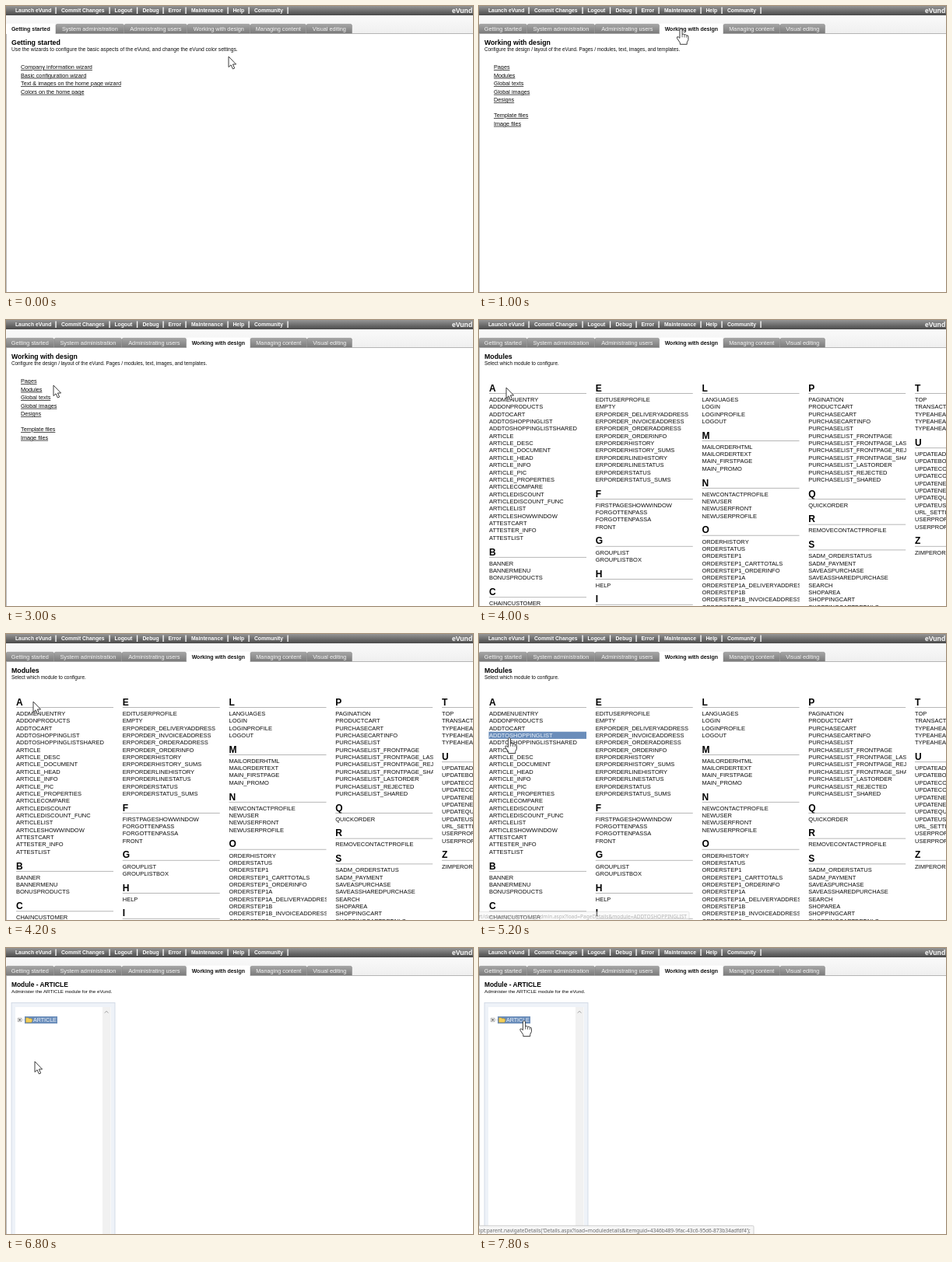
Write an HTML page that moves like this. It is 600 px wide and 368 px high and loops after 8 s.

```html
<!DOCTYPE html>
<html lang="en">
<head>
<meta charset="utf-8">
<title>Shop administration</title>
<style>
html, body { margin: 0; width: 100%; height: 100%; overflow: hidden; background: #fff; }
svg { display: block; width: 100vw; height: 100vh; }
text { font-family: "Liberation Sans", Arial, sans-serif; white-space: pre; }
.status text { font-family: "Noto Sans", "Open Sans", sans-serif; }
</style>
</head>
<body>
<svg id="stage" viewBox="0 0 600 368" preserveAspectRatio="none">
  <defs>
    <linearGradient id="bar" x2="0" y2="1"><stop stop-color="#959595"/><stop offset="1" stop-color="#4a4a4a"/></linearGradient>
    <linearGradient id="strip" x2="0" y2="1"><stop stop-color="#fafafa"/><stop offset="1" stop-color="#efefef"/></linearGradient>
    <linearGradient id="tab" x2="0" y2="1"><stop stop-color="#a6a6a6"/><stop offset="1" stop-color="#7c7c7c"/></linearGradient>
  </defs>
</svg>
<script>
const LOOP = 8000, STEP = 200;
const BRAND = 'eVund';
const BLUE = '#6a8dba', INK = '#0c0c0c';
const stage = document.getElementById('stage');

function add(parent, tag, attrs = {}, content) {
  const el = document.createElementNS('http://www.w3.org/2000/svg', tag);
  for (const key in attrs) el.setAttribute(key, attrs[key]);
  if (content !== undefined) el.textContent = content;
  parent.appendChild(el);
  return el;
}
const group = (parent = stage, attrs) => add(parent, 'g', attrs);
const rect = (parent, x, y, width, height, fill, more) =>
  add(parent, 'rect', { x, y, width, height, fill, ...more });
const text = (parent, x, y, size, str, fill = INK, more) =>
  add(parent, 'text', { x, y, 'font-size': size, fill, ...more }, str);
const show = (el, on) => el.setAttribute('display', on ? 'inline' : 'none');
const BOLD = { 'font-weight': 700 };

// Fixed frame around every page
rect(stage, 0, 0, 600, 368, '#fff');
rect(stage, 0, 12, 600, 23.5, 'url(#strip)');
rect(stage, 0, 0, 600, 12, 'url(#bar)');
rect(stage, 0, 35, 600, 0.8, '#a5a5a5');
rect(stage, 0, 35, 0.9, 333, '#b0b0b0');
[['Launch ' + BRAND, 12, 64], ['Commit Changes', 71, 133], ['Logout', 139.5, 168.5],
 ['Debug', 175.5, 202], ['Error', 208.5, 231], ['Maintenance', 238, 285],
 ['Help', 291.5, 312], ['Community', 319, 362]].forEach(([label, x, end]) => {
  text(stage, x, 8.3, 6.75, label, '#fff', BOLD);
  rect(stage, end - 0.6, 1.5, 1.3, 8.5, '#fff');
});
text(stage, 573, 9.3, 8.7, BRAND, '#fff', BOLD);

// Tab strips
const TABS = ['Getting started', 'System administration', 'Administrating users',
  'Working with design', 'Managing content', 'Visual editing'];

function tabStrip(edges, active) {
  const g = group();
  TABS.forEach((label, i) => {
    const a = edges[i], b = edges[i + 1], on = i === active;
    const top = on ? 22.5 : 23.3, bottom = on ? 36 : 35;
    add(g, 'path', {
      d: `M${a} ${bottom}V${top + 2}q0-2 2-2H${b - 2.5}q2 0 2 2V${bottom}z`,
      fill: on ? '#fff' : 'url(#tab)', stroke: on ? 'none' : '#777', 'stroke-width': 0.4
    });
    text(g, (a + b) / 2 - 0.2, 32.2, on ? 7 : 7.3, label, on ? '#111' : '#f6f6f6',
      { 'text-anchor': 'middle', 'font-weight': on ? 700 : 400 });
  });
  return g;
}
const startTabs = tabStrip([0, 64, 152, 233, 314, 386, 445], 0);
const designTabs = tabStrip([0, 62, 149, 232, 314, 387, 445], 3);

function page(title, titleSize, note, noteSize) {
  const g = group();
  text(g, 7, 50.3, titleSize, title, '#000', BOLD);
  text(g, 7, 58.4, noteSize, note);
  return g;
}

function links(parent, labels) {
  let y = 81.1;
  labels.forEach(label => {
    if (label) text(parent, 19, y, 7.25, label, INK, { 'text-decoration': 'underline' });
    y += label ? 10.55 : 9.3;
  });
}

const startPage = page('Getting started', 8.85,
  `Use the wizards to configure the basic aspects of the ${BRAND}, and change the ${BRAND} color settings.`, 6.68);
links(startPage, ['Company information wizard', 'Basic configuration wizard',
  'Text & images on the home page wizard', 'Colors on the home page']);

const designPage = page('Working with design', 8.7,
  `Configure the design / layout of the ${BRAND}. Pages / modules, text, images, and templates.`, 6.33);
links(designPage, ['Pages', 'Modules', 'Global texts', 'Global images', 'Designs', '',
  'Template files', 'Image files']);

// Module index: each string holds a letter and its modules
const INDEX = [
  ['A ADDMENUENTRY ADDONPRODUCTS ADDTOCART ADDTOSHOPPINGLIST ADDTOSHOPPINGLISTSHARED ARTICLE ' +
   'ARTICLE_DESC ARTICLE_DOCUMENT ARTICLE_HEAD ARTICLE_INFO ARTICLE_PIC ARTICLE_PROPERTIES ' +
   'ARTICLECOMPARE ARTICLEDISCOUNT ARTICLEDISCOUNT_FUNC ARTICLELIST ARTICLESHOWWINDOW ' +
   'ATTESTCART ATTESTER_INFO ATTESTLIST',
   'B BANNER BANNERMENU BONUSPRODUCTS', 'C CHAINCUSTOMER'],
  ['E EDITUSERPROFILE EMPTY ERPORDER_DELIVERYADDRESS ERPORDER_INVOICEADDRESS ERPORDER_ORDERADDRESS ' +
   'ERPORDER_ORDERINFO ERPORDERHISTORY ERPORDERHISTORY_SUMS ERPORDERLINEHISTORY ' +
   'ERPORDERLINESTATUS ERPORDERSTATUS ERPORDERSTATUS_SUMS',
   'F FIRSTPAGESHOWWINDOW FORGOTTENPASS FORGOTTENPASSA FRONT',
   'G GROUPLIST GROUPLISTBOX', 'H HELP', 'I'],
  ['L LANGUAGES LOGIN LOGINPROFILE LOGOUT', 'M MAILORDERHTML MAILORDERTEXT MAIN_FIRSTPAGE MAIN_PROMO',
   'N NEWCONTACTPROFILE NEWUSER NEWUSERFRONT NEWUSERPROFILE',
   'O ORDERHISTORY ORDERSTATUS ORDERSTEP1 ORDERSTEP1_CARTTOTALS ORDERSTEP1_ORDERINFO ORDERSTEP1A ' +
   'ORDERSTEP1A_DELIVERYADDRESS ORDERSTEP1B ORDERSTEP1B_INVOICEADDRESS ORDERSTEP2'],
  ['P PAGINATION PRODUCTCART PURCHASECART PURCHASECARTINFO PURCHASELIST PURCHASELIST_FRONTPAGE ' +
   'PURCHASELIST_FRONTPAGE_LAST PURCHASELIST_FRONTPAGE_REJECTED PURCHASELIST_FRONTPAGE_SHARED ' +
   'PURCHASELIST_LASTORDER PURCHASELIST_REJECTED PURCHASELIST_SHARED',
   'Q QUICKORDER', 'R REMOVECONTACTPROFILE',
   'S SADM_ORDERSTATUS SADM_PAYMENT SAVEASPURCHASE SAVEASSHAREDPURCHASE SEARCH SHOPAREA ' +
   'SHOPPINGCART SHOPPINGCARTDETAILS'],
  ['T TOP TRANSACTIONS TYPEAHEAD TYPEAHEAD_A TYPEAHEAD_B',
   'U UPDATEADDRESS UPDATEBOX UPDATECONTACT UPDATECOMPANY UPDATENEWS UPDATENEWSLIST UPDATEQUANTITY ' +
   'UPDATEUSER URL_SETTINGS USERPROFILE USERPROFILES', 'Z ZIMPERORDER']
].map(col => col.map(s => s.split(' ')));
const ROW = 9.37;

const indexPage = page('Modules', 8.8, 'Select which module to configure.', 6.42);
const rows = [];
INDEX.forEach((col, c) => {
  const x = 13 + c * 136.75;
  const clip = add(stage.querySelector('defs'), 'clipPath', { id: 'col' + c });
  rect(clip, x - 1, 70, 126.5, 300, '#000');
  const g = group(indexPage, { 'clip-path': `url(#col${c})` });
  let y = 87.3;
  col.forEach(([letter, ...items]) => {
    text(g, x, y + 4.4, 12, letter, '#000', BOLD);
    rect(g, x, y + 6.8, 125, 0.7, '#999');
    y += 14.8;
    items.forEach(name => {
      const back = rect(g, x - 0.5, y - 4.5, 125.5, 9.2, BLUE, { display: 'none' });
      const label = text(g, x, y + 2.7, 7.5, name);
      if (c === 0) rows.push({ y, name, back, label });
      y += ROW;
    });
    y += 18 - ROW;
  });
});

// Single module page with its tree panel
const modulePage = page('Module - ARTICLE', 8.4, `Administer the ARTICLE module for the ${BRAND}.`, 6.19);
rect(modulePage, 7, 70.5, 133, 310, '#eef2f8', { stroke: '#c6d0de', 'stroke-width': 0.7 });
rect(modulePage, 12, 76, 123, 300, '#fff');
rect(modulePage, 124, 76, 10.5, 300, '#f1f1f1');
add(modulePage, 'path', { d: 'M126.8 83.6l2.3-2.4 2.3 2.4', fill: 'none', stroke: '#a0a0a0' });
rect(modulePage, 15.4, 90.2, 4.6, 4.6, '#fff', { stroke: '#888', 'stroke-width': 0.6 });
add(modulePage, 'path', { d: 'M16.4 92.5h2.6M17.7 91.2v2.6', stroke: '#222', 'stroke-width': 0.7 });
add(modulePage, 'path', { d: 'M20.5 92.5h3.5', stroke: '#999', 'stroke-width': 0.5, 'stroke-dasharray': '1 1' });
rect(modulePage, 24, 88, 42, 9.2, BLUE);
add(modulePage, 'path', { d: 'M25.5 95.8v-6h3l1 1h3.5v1.2h1.2l-1.4 3.8z', fill: '#f3cf58', stroke: '#b08a2c', 'stroke-width': 0.5 });
text(modulePage, 35, 95.3, 7.1, 'ARTICLE', '#eef4fb');

// Browser status bubble
const status = group(stage, { class: 'status' });
const bubble = rect(status, -3, 357.3, 10, 14, '#f6f6f6', { rx: 1.5, stroke: '#bdbdbd', 'stroke-width': 0.7 });
const statusText = text(status, 0, 366, 6.56, '', '#6a6a6a');

function setStatus(str, end, opacity, alignEnd) {
  show(status, str);
  if (!str) return;
  status.setAttribute('opacity', opacity);
  bubble.setAttribute('width', end + 3);
  statusText.textContent = str;
  statusText.setAttribute('x', alignEnd ? end - 3 : 0);
  statusText.setAttribute('text-anchor', alignEnd ? 'end' : 'start');
}

// Pointers, hot spot at 0,0
const pen = { fill: '#fff', stroke: '#333', 'stroke-width': 0.95, 'stroke-linejoin': 'round' };
const arrow = group();
add(arrow, 'path', { d: 'M0 0V13.6L3.1 10.8 5.4 16 7.7 15 5.4 10H9.6z', ...pen });
const hand = group();
add(hand, 'path', {
  d: 'M-1.6 1.2Q0-1.4 1.6 1.2V7.4Q3.2 5.9 4.5 7.7 6.3 6.7 7.2 8.5 9.4 8 9.4 10.4V14.2L7.7 17.6V20H-1.2V18L-5.2 12Q-5.4 9.5-3.2 10.6L-1.6 12z', ...pen
});
add(hand, 'path', { d: 'M1.6 7.4V11M4.5 8V11.2M7.2 8.8V11.4', fill: 'none', stroke: '#333', 'stroke-width': 0.75 });

// Pointer stops: time, x, y
const PATH = [[0, 286, 65], [800, 259.5, 29.3], [2000, 259.5, 29.3], [3000, 61, 84], [3400, 35, 87],
  [4200, 35, 87], [5200, 39, 133.6], [5800, 37, 146], [6800, 37, 146], [7600, 58, 93.6], [LOOP, 58, 93.6]];

function pointerAt(t) {
  const i = PATH.findIndex(p => p[0] > t);
  const [t0, x0, y0] = PATH[i - 1], [t1, x1, y1] = PATH[i];
  const u = (t - t0) / (t1 - t0), k = u * u * (3 - 2 * u);
  return [x0 + (x1 - x0) * k, y0 + (y1 - y0) * k];
}

function draw(t) {
  const [x, y] = pointerAt(t);
  const onStart = t < 1000, onDesign = t >= 1000 && t < 4000;
  const onIndex = t >= 4000 && t < 6800, onModule = t >= 6800;
  show(startTabs, onStart);
  show(designTabs, !onStart);
  show(startPage, onStart);
  show(designPage, onDesign);
  show(indexPage, onIndex);
  show(modulePage, onModule);

  let hover = null;
  rows.forEach(row => {
    const on = onIndex && Math.abs(row.y - y) < ROW / 2;
    if (on) hover = row;
    show(row.back, on);
    row.label.setAttribute('fill', on ? '#eef4fb' : INK);
  });

  const loading = t >= 6200 && onIndex;
  const onTree = t >= 7600;
  if (onTree) setStatus("ipt:parent.navigateDetails('Details.aspx?load=moduledetails&itemguid=4346b489-9fac-43c6-95d6-873b34adfdf4');", 353, 1);
  else if (loading) setStatus('g for localhost...', 66, 1);
  else if (hover && t >= 5200) {
    setStatus('rt/data/webs/admin/ListAdmin.aspx?load=PageDetails&module=' + hover.name, 270, t < 5400 ? 0.5 : 1, true);
  } else setStatus('');

  const onTab = y < 35;
  const onLink = onDesign && t >= 3400;
  const pointing = onTab || onLink || onTree || (hover && !loading);
  show(hand, pointing);
  show(arrow, !pointing);
  (pointing ? hand : arrow).setAttribute('transform', `translate(${x} ${y})`);
}

function tick() {
  const t = performance.now() % LOOP;
  draw(Math.floor(t / STEP) * STEP);
  requestAnimationFrame(tick);
}
tick();
</script>
</body>
</html>
```
